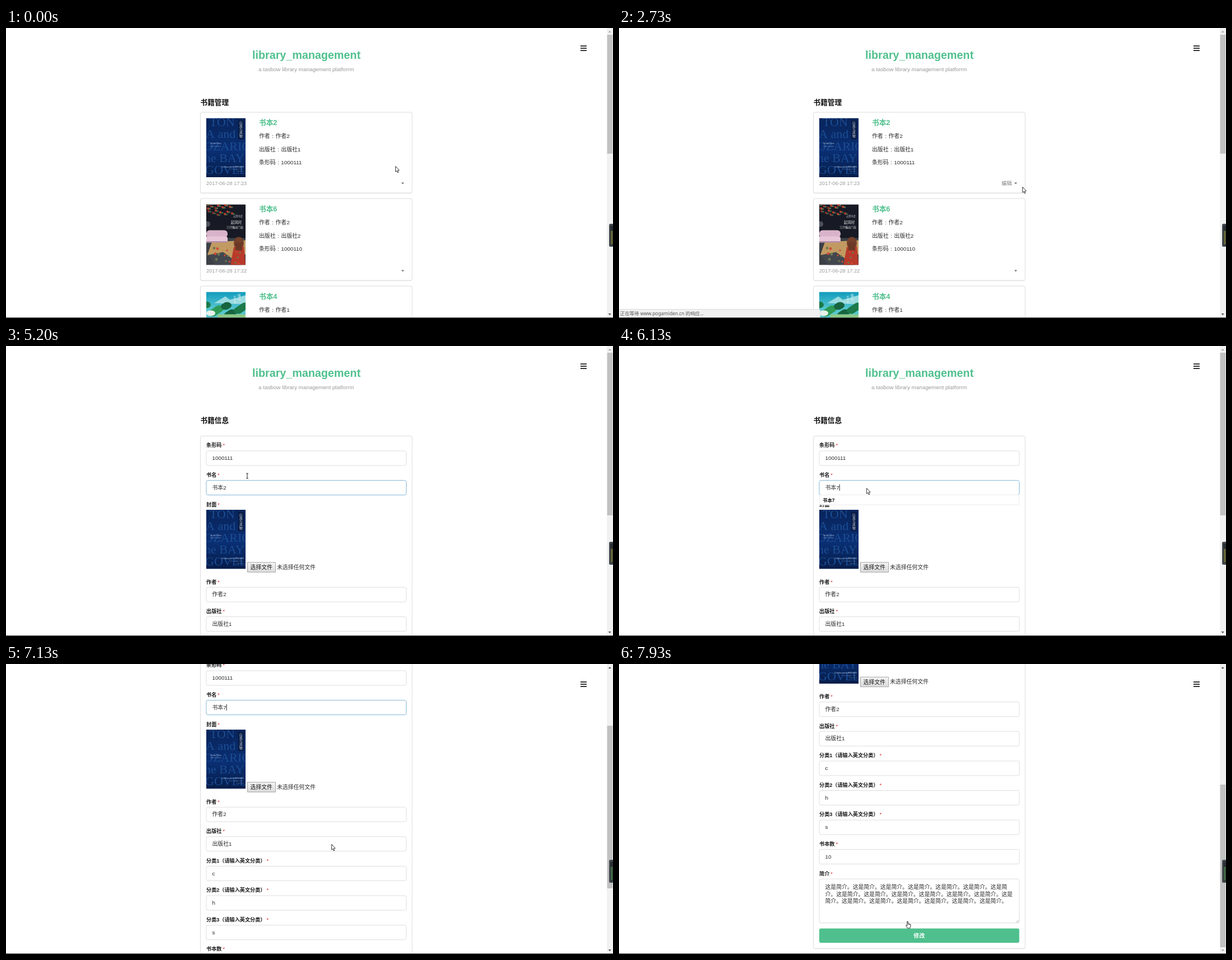
Recreate the animation shown at these times as an HTML page with a canvas. Size 1082 by 517 pixels, loop 8 s.

```html
<!DOCTYPE html>
<html lang="zh-CN">
<head>
<meta charset="utf-8">
<title>library_management</title>
<style>
html, body { margin: 0; width: 100%; height: 100%; overflow: hidden; background: #fff; }
canvas { display: block; }
</style>
</head>
<body>
<canvas id="stage" width="1082" height="517"></canvas>
<script>
const ctx = document.getElementById('stage').getContext('2d');
const LOOP = 8000;
const SANS = '"Liberation Sans", "Noto Sans CJK SC", sans-serif';
const UI = '"Noto Sans", "Noto Sans CJK SC", sans-serif';
const SERIF = '"Liberation Serif", "Noto Sans CJK SC", serif';
const GREEN = '#4fc08d', INK = '#2b2b2b', GRAY = '#999';
const BODY = 9.84, SMALL = 9.14, TINY = 8.44, HEAD = 12.66;

// [time, kind, x, y]
const CURSOR = [
  [0, 'arrow', 694, 246], [70, 'arrow', 700, 253], [200, 'hand', 704, 259],
  [730, 'hand', 706, 266], [800, 'hand', 709, 276], [870, 'hand', 713, 284],
  [1070, 'hand', 715, 284], [1130, 'hand', 716, 284], [2000, 'busy', 719, 283],
  [2730, 'arrow', 719, 283], [3870, 'arrow', 690, 281], [3930, 'arrow', 640, 279],
  [4000, 'arrow', 590, 278], [4070, 'arrow', 540, 277], [4130, 'arrow', 495, 278],
  [4270, 'arrow', 475, 268], [4330, 'beam', 458, 259], [4400, 'beam', 448, 255],
  [4470, 'beam', 440, 252], [4730, 'beam', 434, 242], [4800, 'beam', 430, 231.5],
  [6130, 'arrow', 441, 253], [6200, 'arrow', 443, 260], [6270, 'arrow', 444, 266],
  [6400, 'arrow', 445, 269], [6730, 'arrow', 446, 289], [6870, 'arrow', 490, 300],
  [6930, 'arrow', 520, 308], [7070, 'arrow', 560, 317], [7130, 'arrow', 580, 321],
  [7200, 'arrow', 615, 327], [7330, 'arrow', 655, 333], [7400, 'arrow', 678, 337],
  [7530, 'arrow', 692, 339], [7670, 'arrow', 655, 362], [7730, 'arrow', 605, 392],
  [7800, 'arrow', 560, 424], [7870, 'arrow', 526, 448], [7930, 'hand', 511, 458]
];
const SCROLL = [[0, 0], [6870, 35], [6930, 70], [7070, 125], [7130, 175],
  [7200, 225], [7330, 290], [7400, 330], [7530, 362.5]];
const MENU = [[0, 0], [670, .25], [730, .6], [800, .9], [870, 1],
  [1930, .8], [2000, .5], [2070, .2], [2130, 0]];
const STATUS = [[0, 0], [1330, .5], [1400, 1], [3870, .7], [3930, .35], [4000, 0]];
const STATUS_TEXT = [[0, 'www.pogamiden.cn/library_management/book/edit/2'],
  [2070, '正在连接...'], [2470, '正在等待 www.pogamiden.cn 的响应...']];
const TITLE = [[0, '书本2'], [5330, '书本'], [5730, '书本7']];
const ROWS = [[0, 0], [5330, 7], [5730, 0], [5800, 1], [6600, 0]];
const CARET = [[0, 0], [4670, 1], [5200, 0], [5330, 1], [6270, 0], [6600, 1]];

const at = (list, t) => list.filter(k => k[0] <= t).pop();
const val = (list, t) => at(list, t)[1];

function text(str, x, cy, size, color = INK, o = {}) {
  ctx.font = `${o.bold ? 'bold ' : ''}${size}px ${o.font || SANS}`;
  ctx.textAlign = o.align || 'left';
  ctx.fillStyle = color;
  ctx.fillText(str, x, cy + size * .37);
  return ctx.measureText(str).width;
}

function rect(x, y, w, h, color) {
  ctx.fillStyle = color;
  ctx.fillRect(x, y, w, h);
}

function box(x, y, w, h, r, fill, stroke) {
  ctx.beginPath();
  ctx.roundRect(x, y, w, h, r);
  if (fill) { ctx.fillStyle = fill; ctx.fill(); }
  if (stroke) { ctx.strokeStyle = stroke; ctx.lineWidth = 1; ctx.stroke(); }
}

function poly(pts, fill, stroke) {
  ctx.beginPath();
  for (let i = 0; i < pts.length; i += 2) ctx.lineTo(pts[i], pts[i + 1]);
  ctx.closePath();
  if (fill) { ctx.fillStyle = fill; ctx.fill(); }
  if (stroke) { ctx.strokeStyle = stroke; ctx.lineWidth = .9; ctx.stroke(); }
}

function dot(x, y, rx, color, ry = rx) {
  ctx.beginPath();
  ctx.ellipse(x, y, rx, ry, 0, 0, 7);
  ctx.fillStyle = color;
  ctx.fill();
}

function panel(y, h) {
  box(346.5, y + 1.2, 377.5, h, 3, '#ededed');
  box(346.5, y, 377.5, h, 3, '#fff', '#dcdcdd');
}

function cover(x, y, h, paint) {
  ctx.save();
  ctx.translate(x, y);
  ctx.beginPath();
  ctx.rect(0, 0, 70, h);
  ctx.clip();
  paint(h);
  ctx.restore();
}

function blueCover(h) {
  const g = ctx.createLinearGradient(0, 0, 0, h);
  g.addColorStop(0, '#08245a');
  g.addColorStop(.55, '#0a2f73');
  g.addColorStop(1, '#061d4a');
  rect(0, 0, 70, h, g);
  ['TON', 'A and', 'OZARIO', 'he BAY', 'GOVEL'].forEach((s, i) =>
    text(s, [6, -1, -4, -3, -2][i], 6.5 + i * 21.2, 22, '#1b4c92', { font: SERIF }));
  rect(57, 4, 10, 34, '#071b44');
  [...'山岚与风物'].forEach((c, i) => text(c, 59, 8.5 + i * 6, 5.6, '#dfe5ef'));
  text('Tolan Prew', 7, 45, 4.4, '#c3cfe4', { font: SERIF });
  text('a tale of coasts', 7, 50, 2.8, '#7f97c2');
  text('The Harbour and its MERCHANTS', 27, 87, 2.6, '#c3cfe4');
  text('letters from the shore', 42, 91, 2.4, '#93a6c9');
  text('MARE NOVO', 53, 95, 2.4, '#93a6c9');
}

function nightCover(h) {
  rect(0, 0, 70, h, '#171a24');
  rect(0, 60, 70, 48, '#3c4046');
  for (let i = 0; i < 16; i++) {
    const x = i * 17 % 47, y = i * 11 % 21;
    dot(x + 2, y + 1, 3.4, i % 2 ? '#3d5a44' : '#5b6b4b', 1.6);
    dot(x, y, 1.9, i % 3 ? '#c33b2c' : '#8e2a26');
  }
  dot(2, 35, 5, '#4c515c');
  poly([10, 67, 70, 64, 70, 89, 45, 96, 2, 90], '#c19a62');
  poly([4, 90, 30, 85, 62, 108, 16, 108], '#43484e');
  box(0, 46, 38, 13, 6, '#d9b3c9');
  box(-4, 57, 42, 11, 4, '#e6c6d8');
  rect(0, 66, 37, 2, '#a77f97');
  dot(58, 69, 9, '#74402a', 11);
  poly([49, 76, 67, 75, 70, 108, 43, 108], '#b83a2b');
  rect(52, 68, 12, 14, '#6b3826');
  for (let i = 0; i < 15; i++) {
    dot(14 + i * 19 % 55, 78 + i * 13 % 29, i % 3 ? 1.6 : 2.3, i % 2 ? '#d04a36' : '#6f7a52');
  }
  text('云野舟渡', 48, 21, 4.2, '#b9bcc4');
  text('起风时', 44, 32, 6.4, '#f0f0f0');
  text('三只猫出门去', 36, 41, 5, '#f0f0f0');
}

function gardenCover(h) {
  const g = ctx.createLinearGradient(0, 0, 0, 30);
  g.addColorStop(0, '#119bbd');
  g.addColorStop(1, '#55c6cf');
  rect(0, 0, 70, h, g);
  poly([14, 20, 34, 8, 42, 14, 70, 6, 70, 22], '#9adbe0');
  for (let i = 0; i < 16; i++) {
    dot(i * 23 % 72, 23 + i * 7 % 19, 8, ['#1d7a4a', '#2f9a57', '#176540'][i % 3], 6);
  }
  dot(8, 38, 8, '#e6f0ea', 5);
  rect(20, 40, 50, 8, '#8cc98a');
  [...'晴山'].forEach((c, i) => text(c, 56, 7 + i * 6, 5.5, '#eefafa'));
  [...'好时光'].forEach((c, i) => text(c, 49, 9 + i * 5, 4, '#eefafa'));
}

function header(title) {
  text('library_management', 535.5, 47.6, 19.73, GREEN, { bold: true, align: 'center' });
  text('a tasbow library management platforrm', 535.2, 73.5, BODY, GRAY, { align: 'center' });
  text(title, 346.5, 132, HEAD, '#111', { bold: true });
}

function field(label, value, cy) {
  const x = 451, n = label.length;
  text(label, x, cy, BODY);
  text(':', x + (n + .5) * BODY, cy + .5, BODY, INK, { align: 'center' });
  text(value, x + (n + 1) * BODY, cy, BODY);
}

function bookCard(y, h, imgH, paint, title, author, press, code, date) {
  panel(y, h);
  cover(357, y + 10.4, imgH, paint);
  text(title, 451, y + 18.2, HEAD, GREEN, { bold: true });
  field('作者', author, y + 42);
  field('出版社', press, y + 66);
  field('条形码', code, y + 89);
  text(date, 357, y + h - 17.4, SMALL, GRAY);
  const cy = y + h - 18.5;
  poly([704.4, cy, 709.8, cy, 707.1, cy + 3], '#777');
}

function menu(t) {
  const k = val(MENU, t);
  if (!k) return;
  ctx.save();
  ctx.globalAlpha = k;
  ctx.translate(0, 286 * (1 - k));
  ctx.scale(1, k);
  box(700.5, 287.5, 43, 48, 3, '#e6e6e6');
  box(700.5, 286, 43, 48, 3, '#fff', '#d8d8d9');
  if (t >= 870) rect(701, 286.5, 42, 23.5, '#f2f2f2');
  text('编辑', 712, 298, BODY, GRAY);
  text('删除', 712, 321.6, BODY, GRAY);
  if (t >= 1070) {
    const w = t < 1130 ? 10 : 20;
    rect(722 - w / 2, 303, w, 1.7, GREEN);
  }
  ctx.restore();
}

function listPage(t) {
  header('书籍管理');
  bookCard(150.2, 143.8, 105.5, blueCover, '书本2', '作者2', '出版社1', '1000111', '2017-06-28 17:23');
  bookCard(304, 146, 108, nightCover, '书本6', '作者2', '出版社2', '1000110', '2017-06-28 17:22');
  bookCard(460, 146, 108, gardenCover, '书本4', '作者1', '出版社1', '1000108', '2017-06-28 17:20');
  if (t >= 1930) text('编辑', 682, 276.6, SMALL, '#808080');
  menu(t);
}

function label(str, cy) {
  const w = text(str, 357, cy, SMALL, '#1a1a1a', { bold: true });
  text('*', 357 + w + 2, cy, SMALL, '#db2828');
}

function input(name, value, cy, o = {}) {
  label(name, cy);
  box(357, cy + 10, 356.5, 26, 3, o.fill || '#fff', o.border || '#dededf');
  return text(value, 367.5, cy + 22.6, BODY);
}

function suggestions(n, hover) {
  if (!n) return;
  const step = 16.6;
  rect(357, 265, 356.5, n * step + 1.4, '#fff');
  ctx.strokeStyle = '#ececec';
  ctx.lineWidth = 1;
  ctx.strokeRect(357.5, 265.5, 355.5, n * step + 1);
  if (hover) rect(358, 266, 354.5, step, '#e8e8e8');
  for (let i = 0; i < n; i++) {
    text('书本' + (n === 1 ? 7 : i + 1), 363, 274.6 + i * step, TINY, '#111', { bold: true });
  }
}

function formPage(t) {
  const focus = t >= 4670, preview = t >= 6270 && t < 6600;
  header('书籍信息');
  panel(160.5, 709);
  input('条形码', '1000111', 177);
  const w = input('书名', val(TITLE, t), 229.6, {
    border: focus && '#85b7d9', fill: preview && '#faffbd'
  });
  if (val(CARET, t)) rect(367.5 + w, 246.5, 1, 11.5, '#222');

  label('封面', 282.2);
  cover(357, 292, 105.5, blueCover);
  const g = ctx.createLinearGradient(0, 386, 0, 403);
  g.addColorStop(0, '#f4f4f4');
  g.addColorStop(1, '#dcdcdc');
  box(430.5, 385.8, 50, 17.4, 0, g, '#a6a6a6');
  text('选择文件', 435.6, 394.5, BODY, '#111');
  text('未选择任何文件', 483, 394.2, BODY);

  input('作者', '作者2', 420.2);
  input('出版社', '出版社1', 472.7);
  ['c', 'h', 's'].forEach((v, i) => input(`分类${i + 1}（请输入英文分类）`, v, 525.4 + i * 52.6));
  input('书本数', '10', 683.1);

  label('简介', 736);
  box(357, 745.7, 356.5, 78.5, 3, '#fff', '#dededf');
  const intro = '这是简介。'.repeat(20);
  [[0, 33], [33, 67], [67, 100]].forEach(([a, b], i) =>
    text(intro.slice(a, b), 367.5, 760 + i * 12.5, BODY));
  ctx.strokeStyle = '#888';
  ctx.lineWidth = .7;
  for (const d of [2, 5]) {
    ctx.beginPath();
    ctx.moveTo(712.5 - d, 823.5);
    ctx.lineTo(712.5, 823.5 - d);
    ctx.stroke();
  }
  box(357, 834, 356.5, 25.4, 3, GREEN);
  text('修改', 535.2, 846.6, BODY, '#fff', { bold: true, align: 'center' });
  suggestions(val(ROWS, t), preview);
}

function chrome(t, scroll, form) {
  for (const y of [31.2, 35.2, 39.2]) rect(1024, y, 11, 1.8, '#222');

  rect(1071, 0, 11, 517, '#f1f1f1');
  rect(1071.6, 12 + scroll * .56, 9.6, form ? 290 : 212, '#c1c1c1');
  poly([1073.6, 8, 1078.8, 8, 1076.2, 5], scroll ? '#505050' : '#a3a3a3');
  poly([1073.6, 509, 1078.8, 509, 1076.2, 512], scroll > 360 ? '#a3a3a3' : '#505050');

  box(1075, 349, 12, 41, 2.5, '#454b52');
  box(1077, 352, 10, 35, 1.5, '#2a2f34');
  for (let y = 362; y < 386; y += 2) rect(1078, y, 3.5, 1.2, scroll ? '#4f8f52' : '#8f8f3c');

  const a = val(STATUS, t);
  if (a) {
    ctx.globalAlpha = a;
    box(-3, 501.5, 361.5, 20, 3, '#f1f1f1', '#dcdcdc');
    text(val(STATUS_TEXT, t), 2, 509, TINY, '#555', { font: UI });
    ctx.globalAlpha = 1;
  }
  rect(0, 516, 1082, 1, '#3a3a3a');
}

function pointer(t) {
  const [, kind, x, y] = at(CURSOR, t);
  ctx.save();
  ctx.translate(x, y);
  ctx.lineJoin = 'round';
  if (kind === 'hand') {
    poly([2.6, 1, 4.2, 1, 4.4, 5, 8.2, 5.8, 8.9, 7, 8.6, 10, 7.6, 13, 3.4, 13, .5, 8.4, 1.2, 7.4, 2.6, 8.6], '#fff', '#222');
    ctx.beginPath();
    for (const k of [4.4, 6, 7.4]) { ctx.moveTo(k, 5.4); ctx.lineTo(k, 7.2); }
    ctx.lineWidth = .6;
    ctx.stroke();
  } else if (kind === 'beam') {
    rect(-.5, -4.5, 1, 9, '#222');
    rect(-2, -4.8, 4, .9, '#222');
    rect(-2, 4, 4, .9, '#222');
  } else {
    poly([.5, .5, .5, 10.3, 2.6, 8.4, 4.2, 12, 5.7, 11.3, 4.1, 7.8, 7, 7.6], '#fff', '#222');
    if (kind === 'busy') {
      ctx.beginPath();
      ctx.arc(9.9, 6, 2.6, 0, 7);
      ctx.strokeStyle = '#4aa3d8';
      ctx.lineWidth = 1.4;
      ctx.stroke();
    }
  }
  ctx.restore();
}

function draw(t) {
  const scroll = val(SCROLL, t), form = t >= 3600;
  rect(0, 0, 1082, 517, '#fff');
  ctx.save();
  ctx.translate(0, -scroll);
  (form ? formPage : listPage)(t);
  ctx.restore();
  chrome(t, scroll, form);
  pointer(t);
}

const start = performance.now();
function tick() {
  draw((performance.now() - start) % LOOP);
  requestAnimationFrame(tick);
}
tick();
</script>
</body>
</html>
```
